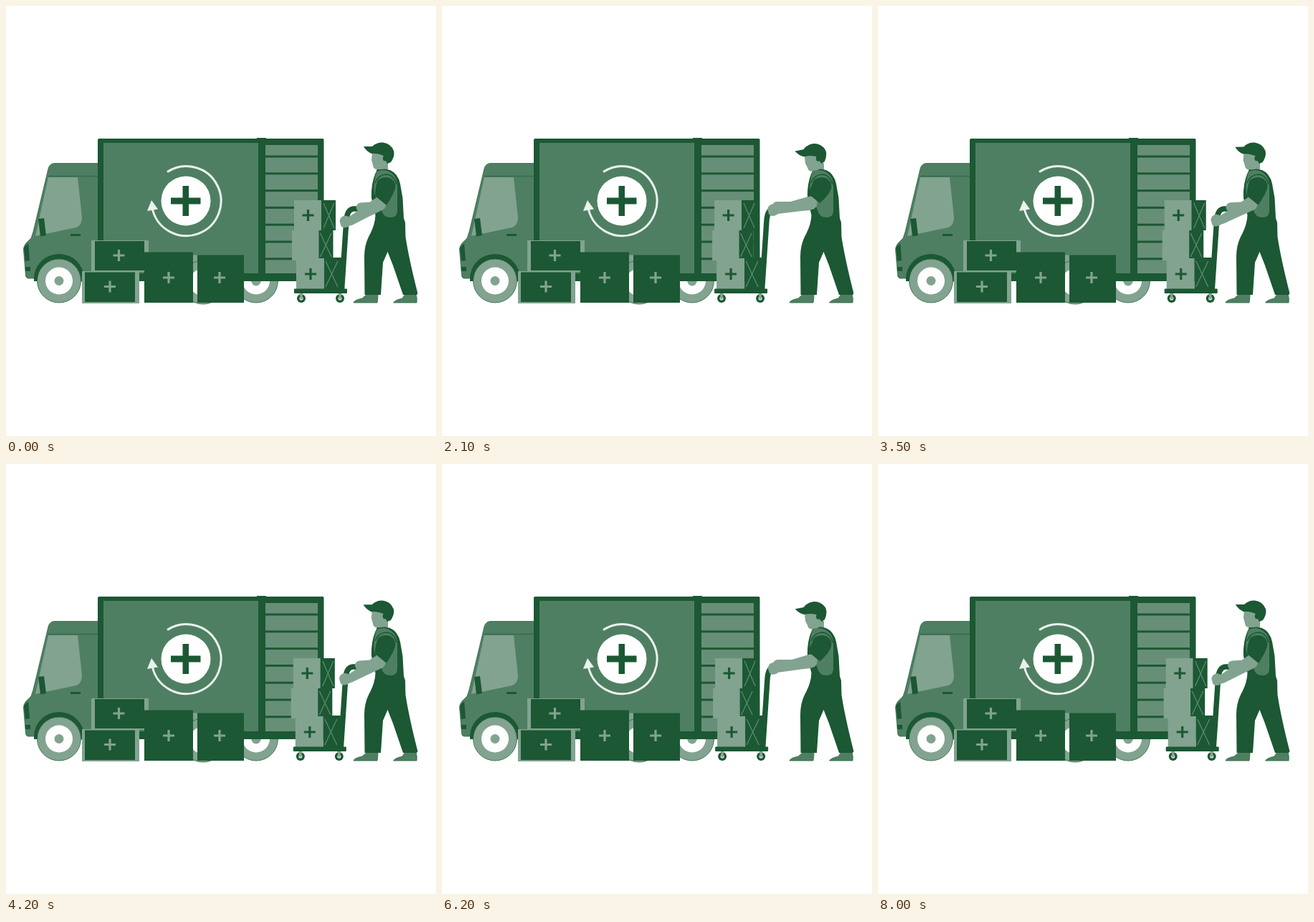
Write an HTML page that moves like this. It is 600 px wide and 600 px high and loops after 8100 ms.

```html
<!DOCTYPE html>
<html lang="en">
<head>
<meta charset="utf-8">
<title>Medical delivery</title>
<style>
  html, body { margin: 0; width: 100%; height: 100%; overflow: hidden; background: #fff; }
  svg { display: block; width: 100vw; height: 100vh; }
  .dark { fill: #1b5833; }
  .mid { fill: #4f7f62; }
  .slat { fill: #678f77; }
  .light { fill: #82a390; }
  .white { fill: #fdfefd; }
  .edge { stroke: #2c6543; stroke-width: .8; }
  .line { fill: none; stroke: #5c896f; stroke-width: 1.3; }
  .soft { filter: blur(.6px); }
</style>
</head>
<body>
<svg viewBox="0 0 600 600">
  <defs>
    <g id="wheel">
      <circle class="light edge" r="30.5"/>
      <g class="soft">
        <circle class="white" r="19"/>
        <circle class="light" r="6.5"/>
      </g>
    </g>
    <path id="cross" d="M-8-1.6h6.4V-8h3.2v6.4H8v3.2H1.6V8h-3.2V1.6H-8z"/>
    <g id="caster">
      <circle class="dark" r="6"/>
      <circle r="2.6" fill="#dce7e0"/>
      <path class="light" d="M-2.2-7h4.4l-.8 8h-2.8z"/>
    </g>
  </defs>

  <!-- cab -->
  <path class="mid edge" d="M68 219.500H131V384H104L44 380H31Q28 380 27.500 376L24.500 340Q24.500 335 28 331L35 324L38 315L59 227Q61 219.500 68 219.500Z"/>
  <path d="M59 237.500H129" fill="none" stroke="#346b4a" stroke-width="1.500"/>
  <path class="light soft" d="M59 239H100L106 295Q106 306 98 309L41 321Z"/>
  <path class="dark" d="M45 297l8-1 3 24-8 1.500zM90 318h14v3H90zM25 337l6-6 2 24-6 1zM27 364h7v6h-7z"/>
  <path class="dark" d="M39 380A35 34 0 0 1 109 380V384H39Z"/>
  <use href="#wheel" x="74" y="383.500"/>
  <use href="#wheel" x="349" y="383.500"/>

  <!-- cargo -->
  <path class="dark" d="M130 185H350V184H363V185H442Q443.500 185 443.500 187V384H128V187Q128 185 130 185Z"/>
  <rect class="mid soft" x="136" y="191" width="216" height="182"/>
  <g id="slats" class="soft"></g>
  <g class="soft">
    <circle cx="251" cy="272" r="34.500" fill="#fff"/>
    <path class="dark" d="M230 267.500h16.500V251h8.500v16.500h16.500v9H255V293h-8.500v-16.500H230z"/>
    <path d="M225 231.500A48.500 48.500 0 1 1 204.500 284" fill="none" stroke="#eaf2ed" stroke-width="3"/>
    <path d="M203 271l9 12.500-15 2.500z" fill="#eaf2ed"/>
  </g>
  <path class="light" d="M342.500 384h13a6.500 6.500 0 0 1-13 0z"/>

  <!-- stacked boxes -->
  <rect class="light" x="260" y="347.500" width="8" height="66.500"/>
  <use href="#wheel" x="275" y="385.500"/>
  <path class="light" d="M119 327H199V344H193V371H119ZM106 370H186V415H106Z"/>
  <path class="dark" d="M124 328H193V369H124ZM110 371.500H180V413H110ZM193 343.500H261V414H193ZM267 347.500H332V414H267Z"/>
  <g class="light soft">
    <use href="#cross" x="157.500" y="348"/>
    <use href="#cross" x="145" y="391.500"/>
    <use href="#cross" x="227" y="379"/>
    <use href="#cross" x="298" y="379"/>
  </g>

  <g id="cart">
    <path d="M468.500 396L475 298Q476.500 283.500 485 283L493 283" fill="none" stroke="#1b5833" stroke-width="7.500"/>
    <path class="light" d="M402 271H440V313H402ZM399 313H437V355H399ZM405 352H444V395H405Z"/>
    <path class="dark" d="M440 271H460V313H440ZM436.500 313H456.500V352H436.500ZM444 351H468V395H444Z"/>
    <path class="line" d="M443 275L458 310M458 275L443 310M438.500 317L454 350M454 317L438.500 350M446 356L463 392M463 356L446 392"/>
    <g class="dark">
      <use href="#cross" x="421.500" y="292"/>
      <use href="#cross" x="425" y="374"/>
      <rect x="402" y="394.500" width="74" height="6.500" rx="1"/>
    </g>
    <use href="#caster" x="412" y="408"/>
    <use href="#caster" x="466" y="408"/>
  </g>

  <path id="farArm" class="light"/>

  <!-- worker -->
  <g>
    <path class="mid edge" d="M504 402H519Q519 408 518 414H485Q486 410 497 408ZM557 402H572Q574 408 573 414H540.500Q543 410 553 408Z"/>
    <path class="light" d="M517 219H533V232H517Z"/>
    <path class="dark" d="M518 228Q527 226 536 229Q547 234 550 248L553.500 268L555 296L557 302L557.500 322Q562 352 574.500 401L573 403H554L540 362L532.500 343L526 358L523 403H500.500L500 350Q500 334 506 322Q515 306 515.500 292L510 268Q509 245 518 228Z"/>
    <path class="mid soft" d="M517 231Q531 225 541 236Q546 241 546 253V287Q545 295 537 295Q526 295 524 285L514 262Q512 248 517 231Z"/>
    <path d="M515 247Q519 236 530 235Q541 235 545 249" fill="none" stroke="#1b5833" stroke-width="1.500"/>
  </g>
  <g id="head">
    <path class="light" d="M511 204H532V219Q531 228 523 228H517Q512 227 512 222L510 215Z"/>
    <path class="dark" d="M499 196L511 196Q517 190 526 190.500Q537 192 541 202Q543 209 537 218L532 220L530 216Q525 217 526 211L527 209Q517 205 510 206Q503 203 499 196Z"/>
  </g>
  <path id="forearm" class="light"/>
  <path id="hand" class="light" d="M-8.500-1q1-7 8-7.500l9 2.500 3 8-8 5q-7 3-10-1z"/>
  <path id="sleeve" class="dark"/>
</svg>
<script>
  const LOOP = 8100, STEP = 100, SWING = 3940, REACH = 22.3;
  const el = id => document.getElementById(id);
  const mix = (a, b, k) => a.map((v, i) => v + (b[i] - v) * k);

  const slat = (y, h) => `<rect class="slat" x="362" y="${y}" width="73" height="${h}"/>`;
  const rows = Array.from({ length: 7 }, (_, i) => slat(211.5 + 23.8 * i, i < 6 ? 20.8 : 18.7));
  el('slats').innerHTML = slat(194, 14.5) + rows.join('');

  // Limb with round ends of radius ra and rb
  function limb([ax, ay], [bx, by], ra, rb) {
    const len = Math.hypot(bx - ax, by - ay);
    const nx = -(by - ay) / len, ny = (bx - ax) / len;
    const p = (x, y, r) => `${(x + nx * r).toFixed(2)} ${(y + ny * r).toFixed(2)}`;
    return `M${p(ax, ay, ra)}L${p(bx, by, rb)}A${rb} ${rb} 0 0 0 ${p(bx, by, -rb)}` +
      `L${p(ax, ay, -ra)}A${ra} ${ra} 0 0 0 ${p(ax, ay, ra)}Z`;
  }

  function draw(time) {
    const t = Math.floor((time % LOOP) / STEP) * STEP;
    const push = (1 - Math.cos(2 * Math.PI * t / SWING + 0.05)) / 2;
    const elbow = mix([521, 276], [514, 275], push);
    const grip = mix([474, 301], [462.5, 284.5], push);
    const wrist = [grip[0] + 7, grip[1] - 1];
    const far = mix([495, 281], [466.5, 279.5], push);

    el('cart').setAttribute('transform', `translate(${-REACH * push} 0)`);
    el('head').setAttribute('transform',
      `translate(${-push} ${1.5 * push}) rotate(${-11 * push} 523 228)`);
    el('farArm').setAttribute('d', limb([517, 279], far, 6, 6.5));
    el('forearm').setAttribute('d', limb(elbow, wrist, 9.5, 6));
    el('hand').setAttribute('transform', `translate(${grip})`);
    const [sx, sy] = mix([0, 0], [-4, -3], push);
    el('sleeve').setAttribute('d',
      `M519 243Q527 237 536 240Q545 245 543 255Q540 264 ${531 + sx} ${278 + sy}` +
      `L${515 + sx} ${265 + sy}Q515 252 519 243Z`);
  }

  const start = performance.now();
  function tick() {
    draw(performance.now() - start);
    requestAnimationFrame(tick);
  }
  draw(0);
  requestAnimationFrame(tick);
</script>
</body>
</html>
```
